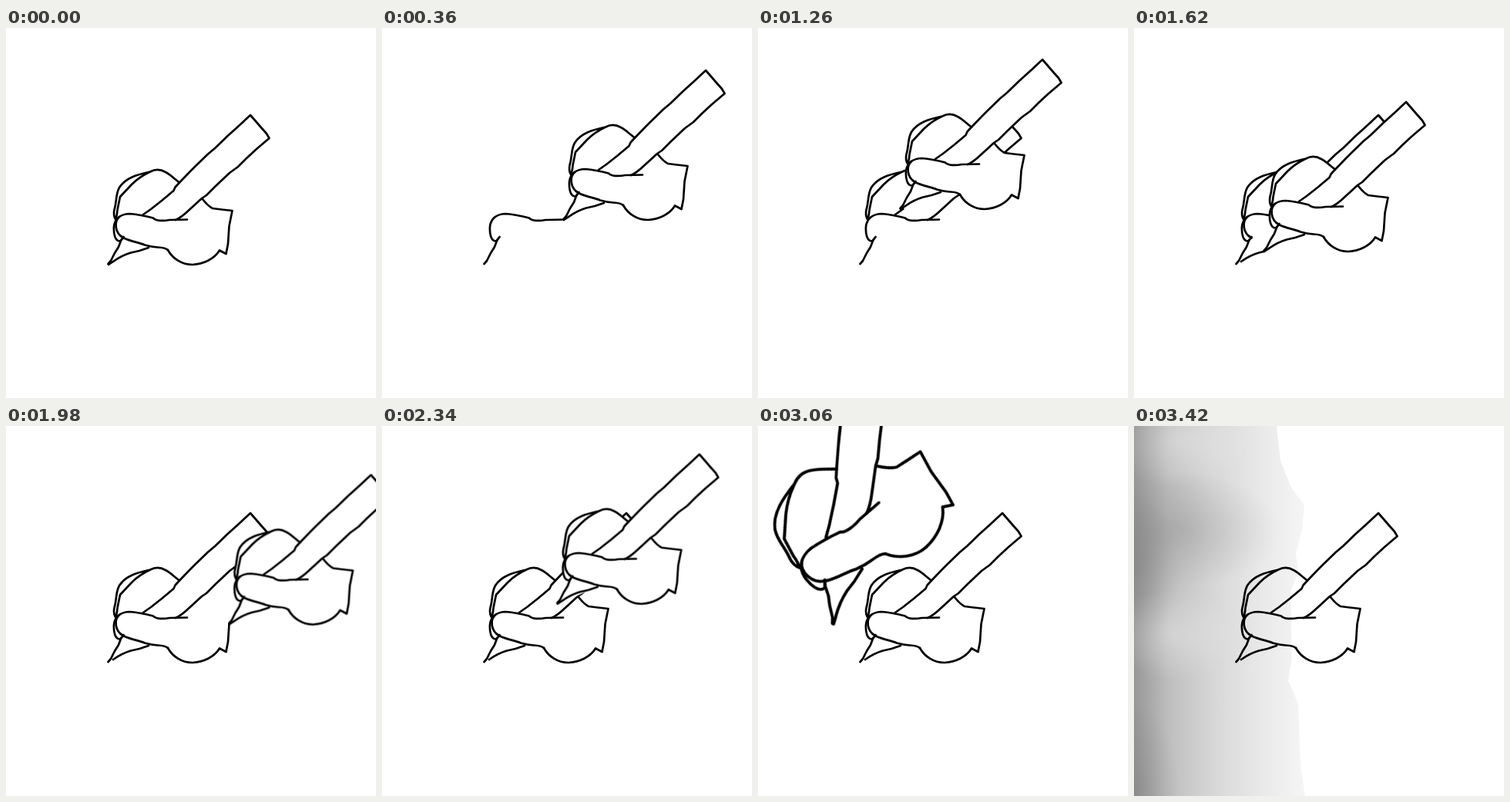
Animation, 480 px wide and 480 px high, one loop 3510 ms. Source, as an HTML page without scripts:

```html
<!DOCTYPE html>
<html lang="en">
<head>
<meta charset="utf-8">
<title>Hand drawing a hand</title>
<style>
html, body { margin: 0; width: 100%; height: 100%; overflow: hidden; background: #fff; }
svg { display: block; width: 100vw; height: 100vh; }

.line { fill: none; stroke: #000; stroke-width: 2.7; stroke-linecap: round; stroke-linejoin: round; }
.ink, .hand, .shade { animation: 3.51s step-end infinite; }
.ink { stroke-dasharray: 1 2; stroke-dashoffset: 1.1; }
.hand { transform-origin: 133px 307px; animation-name: hand; }
.shade { animation-name: shade; }

/* The loop is 39 beats of 90 ms; one beat is 2.564%. */
@keyframes hand {
  0% { transform: none; }
  2.564% { transform: translate(19px, -36px); }
  5.128% { transform: translate(8px, -55px); }
  7.692% { transform: translate(54px, -61px); }
  10.256% { transform: translate(103px, -58px); }
  12.82% { transform: translate(104px, -74px); }
  15.384% { transform: translate(152px, -115px); }
  17.948% { transform: translate(198px, -155px); }
  20.512% { transform: translate(179px, -189px); }
  23.076% { transform: translate(132px, -147px); }
  25.64% { transform: translate(92px, -106px); }
  28.205% { transform: translate(57px, -121px); }
  30.769% { transform: translate(12px, -97px); }
  33.333% { transform: translate(10px, -60px); }
  35.897% { transform: translate(52px, -72px); }
  38.461% { transform: translate(86px, -101px); }
  41.025% { transform: translate(19px, -35px); }
  43.589% { transform: translate(6px, -4px); }
  46.153% { transform: translate(36px, -17px); }
  48.717% { transform: translate(77px, -20px); }
  51.282% { transform: translate(109px, 0); }
  53.846% { transform: translate(145px, -16px); }
  56.41% { transform: translate(156.5px, -49.5px); }
  61.538% { transform: translate(161px, -70px); }
  64.102% { transform: translate(122px, -86px); animation-timing-function: steps(4); }
  74.358% { transform: translate(13px, -47px); }
  76.923% { transform: translate(14.5px, -42px); }
  79.487% { transform: translate(5px, -4px) rotate(-10deg) scale(1.1); }
  82.051% { transform: translate(-8px, 31px) rotate(-20deg) scale(1.2); }
  84.615% { transform: translate(-21px, 0) rotate(-30deg) scale(1.31); }
  87.179% { transform: translate(-35px, -50px) rotate(-39.7deg) scale(1.43); }
  89.743% { transform: translate(-62px, -125px) rotate(-48deg) scale(1.5); }
  92.307% { transform: translate(-600px, -600px); }
}
@keyframes grip {
  0% { stroke-dashoffset: 1; animation-timing-function: steps(4); }
  10.256%, 100% { stroke-dashoffset: 0; }
}
@keyframes pen {
  0% { stroke-dashoffset: 1.1; }
  12.82% { stroke-dashoffset: .93; animation-timing-function: steps(5); }
  25.64%, 100% { stroke-dashoffset: 0; }
}
@keyframes fingers {
  0% { stroke-dashoffset: 1.1; }
  28.205% { stroke-dashoffset: .81; }
  30.769% { stroke-dashoffset: .55; }
  33.333%, 100% { stroke-dashoffset: 0; }
}
@keyframes shaft {
  0% { stroke-dashoffset: 1.1; }
  35.897% { stroke-dashoffset: .8; }
  38.461%, 100% { stroke-dashoffset: 0; }
}
@keyframes thumb {
  0% { stroke-dashoffset: 1.1; }
  41.025% { stroke-dashoffset: .65; }
  48.717%, 100% { stroke-dashoffset: 0; }
}
@keyframes nib {
  0% { stroke-dashoffset: 1.1; }
  46.153% { stroke-dashoffset: .35; }
  48.717%, 100% { stroke-dashoffset: 0; }
}
@keyframes palm {
  0% { stroke-dashoffset: 1.1; }
  51.282% { stroke-dashoffset: .8; }
  53.846% { stroke-dashoffset: .55; }
  56.41% { stroke-dashoffset: .34; }
  61.538% { stroke-dashoffset: .23; }
  64.102%, 100% { stroke-dashoffset: 0; }
}
@keyframes shade {
  0% { transform: translateX(-240px); }
  92.307% { transform: translateX(-150px); }
  94.871% { transform: translateX(-75px); }
  97.435%, 100% { transform: none; }
}
</style>
</head>
<body>
<svg viewBox="0 0 480 480">
  <defs>
    <g id="lines">
      <path id="grip" pathLength="1" d="M132.500 306L136 302 141 292 146 284 149 276 152.500 271 148 276.500C141 277 139.500 266 140 258C141 247 149 241 161 241C171 242 181 244 191 246.500C194 250.500 205 250.500 212 249L235 248.500"/>
      <path id="pen" pathLength="1" d="M220 249Q227 246 236 237.500L254 221 260 217 272 205 290 188 301 180 312 169 325 157 341.500 143 338 137 330 128 324 121 317 113 302 127 287 140.500 271 156 262 163.500 246 179 239 186 225 200.500"/>
      <path id="fingers" pathLength="1" d="M225 200.500C219 196 213 190 207 187Q197 181 187 186.500C171 190 155 194 147 207C142 216 144 224 140.500 236Q139 243 142 248Q144 244 144.500 236L148 219 163 203Q173 193 187 186.500"/>
      <path id="shaft" pathLength="1" d="M178 242L188 235 202 224 217.500 211 219.500 206.500 225 200.500"/>
      <path id="thumb" pathLength="1" d="M147 245C140 251 141 266 152 272C161 277 172 278 180 281.500Q189 284 197 284.500 207 285 210 288"/>
      <path id="nib" pathLength="1" d="M139 303Q150 295 162 291.500L173 289 185 285"/>
      <path id="palm" pathLength="1" d="M210 288C216 299 228 307 242 307C256 306 270 300 277 288.500L285.500 293 288 280 289.500 257 293.500 237 280 235.500 268 234Q262 231 255 222"/>
    </g>
    <linearGradient id="fade">
      <stop stop-color="#979797"/>
      <stop offset=".2" stop-color="#bebebe"/>
      <stop offset=".45" stop-color="#d6d6d6"/>
      <stop offset=".7" stop-color="#e7e7e7"/>
      <stop offset="1" stop-color="#f6f6f6"/>
    </linearGradient>
    <radialGradient id="dark">
      <stop stop-color="#666" stop-opacity=".25"/>
      <stop offset="1" stop-color="#666" stop-opacity="0"/>
    </radialGradient>
    <radialGradient id="light">
      <stop stop-color="#fff" stop-opacity=".3"/>
      <stop offset="1" stop-color="#fff" stop-opacity="0"/>
    </radialGradient>
    <clipPath id="edge">
      <path d="M0 0H185L190 45 204 80 221 102 218 135 210 165 213 190 203 215 205 300 200 330 213 360 216 440 222 480H0Z"/>
    </clipPath>
  </defs>

  <g class="shade">
    <g clip-path="url(#edge)">
      <rect width="224" height="480" fill="url(#fade)"/>
      <ellipse cx="0" cy="185" rx="60" ry="100" fill="url(#dark)"/>
      <ellipse cx="60" cy="135" rx="130" ry="75" fill="url(#dark)"/>
      <ellipse cx="0" cy="475" rx="60" ry="120" fill="url(#dark)"/>
      <ellipse cx="50" cy="270" rx="80" ry="60" fill="url(#light)"/>
      <ellipse cx="60" cy="20" rx="90" ry="60" fill="url(#light)"/>
    </g>
  </g>

  <g class="line">
    <use class="ink" href="#grip" style="animation-name: grip"/>
    <use class="ink" href="#pen" style="animation-name: pen"/>
    <use class="ink" href="#fingers" style="animation-name: fingers"/>
    <use class="ink" href="#shaft" style="animation-name: shaft"/>
    <use class="ink" href="#thumb" style="animation-name: thumb"/>
    <use class="ink" href="#nib" style="animation-name: nib"/>
    <use class="ink" href="#palm" style="animation-name: palm"/>
  </g>

  <g class="hand">
    <path fill="#fff" d="M133 307L150 275C140 279 139 262 141 247C138 235 143 222 146 210C153 192 172 191 187 186Q197 181 207 187L225 201 317 113 342 143 255 222 268 234 294 237 286 293 277 289C270 301 256 306 242 307C228 307 216 299 210 288L185 285Z"/>
    <g class="line">
      <use href="#lines"/>
      <path d="M133 307L139 303"/>
    </g>
  </g>
</svg>
</body>
</html>
```
